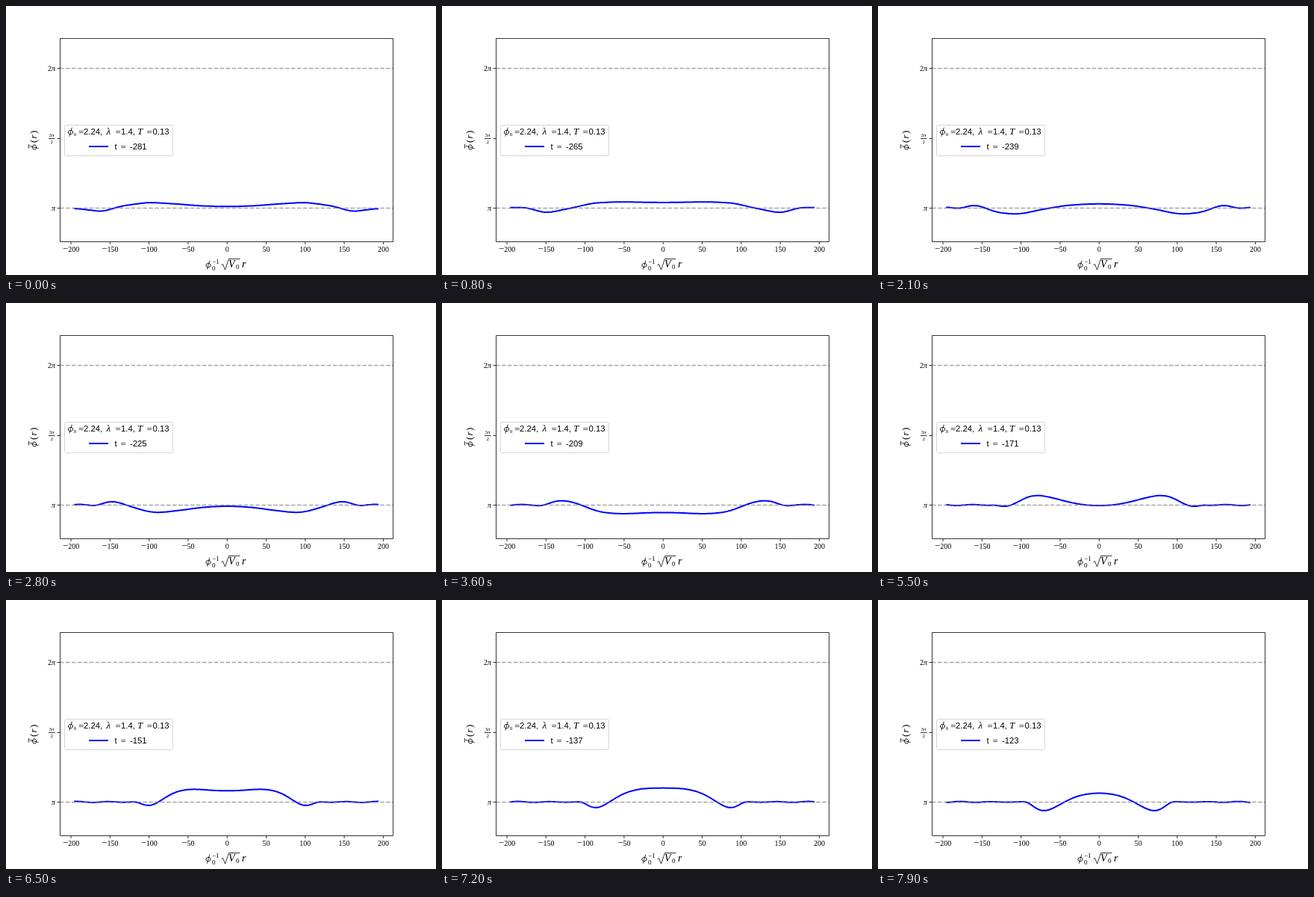
Write an HTML page that moves like this. It is 576 px wide and 360 px high and loops after 8000 ms.

```html
<!DOCTYPE html>
<html lang="en">
<head>
<meta charset="utf-8">
<title>Field profile</title>
<style>
html, body { margin: 0; width: 100%; height: 100%; overflow: hidden; background: #fff; }
svg { display: block; }
text { font: 10px "Liberation Serif", serif; }
.i { font-style: italic; }
.m { font-size: 14px; }
.n { font-size: 13px; }
.s { font-size: 9px; }
.xs { font-size: 7px; }
.sans { font: 11.3px "Liberation Sans", sans-serif; }
.mid { text-anchor: middle; }
.end { text-anchor: end; }
.line { fill: none; stroke: #000; stroke-width: .8; }
.wave { fill: none; stroke: #00f; stroke-width: 2; stroke-linejoin: round; stroke-linecap: square; }
.dash { stroke: #808080; stroke-opacity: .7; stroke-width: 1.5; stroke-dasharray: 5.55 2.4; }
</style>
</head>
<body>
<svg width="576" height="360" viewBox="0 0 576 360">
  <defs>
    <g id="phi" class="line">
      <ellipse cx="4" cy="-3" rx="3.2" ry="2.7" transform="rotate(-20 4 -3)"/>
      <path d="M5.8-9.3 2.3 2.6"/>
    </g>
  </defs>
  <path id="curve" class="wave"/>
  <path class="dash" d="M72 83.5H518.4M72 270.5H518.4"/>
  <path class="line" d="M72.5 43.5H518.5V315.5H72.5Z"/>
  <g id="ticks"></g>

  <text class="i end" x="66" y="87"><tspan font-style="normal">2</tspan>π</text>
  <text class="i end" x="66" y="274">π</text>
  <text class="xs mid" x="61" y="175">3<tspan class="i">π</tspan></text>
  <path class="line" d="M57 177.5H65.5"/>
  <text class="xs mid" x="61.2" y="183.5">2</text>

  <use href="#phi" x="267" y="350"/>
  <text class="s" x="276" y="344.5">−1</text>
  <text class="s" x="276" y="354">0</text>
  <path class="line" d="M288.5 347 290.5 345.5 293.5 353 298.5 338.5H313.5"/>
  <text class="m i" x="298" y="350">V</text>
  <text class="s" x="308" y="352">0</text>
  <text class="m i" x="316" y="350">r</text>

  <g transform="translate(41 193) rotate(-90)">
    <use href="#phi"/>
    <path class="line" d="M2.5-10.5H8"/>
    <text class="n" x="10">(</text>
    <text class="n i" x="15.5">r</text>
    <text class="n" x="22">)</text>
  </g>

  <rect x="78.5" y="159.5" width="145" height="41" rx="2" fill="#fff" fill-opacity=".8" stroke="#ccc" stroke-opacity=".8"/>
  <use href="#phi" x="82.5" y="172"/>
  <text class="xs" x="90.8" y="174">0</text>
  <text class="n" x="97" y="172.5">=</text>
  <text class="sans" x="104" y="172">2.24,</text>
  <text class="n i" x="134.5" y="172">λ</text>
  <text class="n" x="146.5" y="172.5">=</text>
  <text class="sans" x="154" y="172">1.4,</text>
  <text class="n i" x="176" y="172">T</text>
  <text class="n" x="188.5" y="172.5">=</text>
  <text class="sans" x="196.5" y="172">0.13</text>
  <path class="wave" d="M112 188H136"/>
  <text class="sans" x="145.5" y="192">t</text>
  <text class="n" x="153.5" y="192.5">=</text>
  <text class="sans" id="time" x="166" y="192"></text>
</svg>
<script>
const $ = id => document.getElementById(id);
const { PI, sin, cos, exp, sqrt, abs, max, min } = Math;

const smoothstep = x => {
  x = max(0, min(1, x));
  return x * x * (3 - 2 * x);
};

// Fronts of equal phase are hyperbolas t² - 1.32 r² = s², closing in on the centre.
function height(r, t) {
  const s = -sqrt(max(0, t * t - 1.32 * r * r));
  const growth = 21 * exp((t + 123) / 150);
  const envelope = smoothstep((s / t - 0.4) / 0.6);
  const ripple = 0.8 * (r / 195) ** 2 * cos(2 * PI * (abs(r) - 152 + (t + 151) / 2) / 40);
  return ripple - growth * envelope * sin(PI * (s + 228) / 58);
}

const toX = r => 296.2 + 1.046 * r;

let ticks = '<path class="line" d="M72 83.5h-3.5M72 177.5h-3.5M72 270.5h-3.5"/>';
for (let r = -200; r <= 200; r += 50) {
  const x = toX(r), sign = r < 0 ? '<tspan class="n">−</tspan>' : '';
  ticks += `<path class="line" d="M${x} 315.5v3.5"/><text class="mid" x="${x}" y="329">${sign}${abs(r)}</text>`;
}
$('ticks').innerHTML = ticks;

const start = performance.now();
function draw(now) {
  const t = -281 + 2 * Math.floor(max(0, now - start) % 8000 / 100);
  const points = [];
  for (let r = -195; r <= 193; r += 2) {
    points.push(`${toX(r).toFixed(2)} ${(270.3 - height(r, t)).toFixed(2)}`);
  }
  $('curve').setAttribute('d', 'M' + points.join('L'));
  $('time').textContent = t;
  requestAnimationFrame(draw);
}
draw(start);
</script>
</body>
</html>
```
